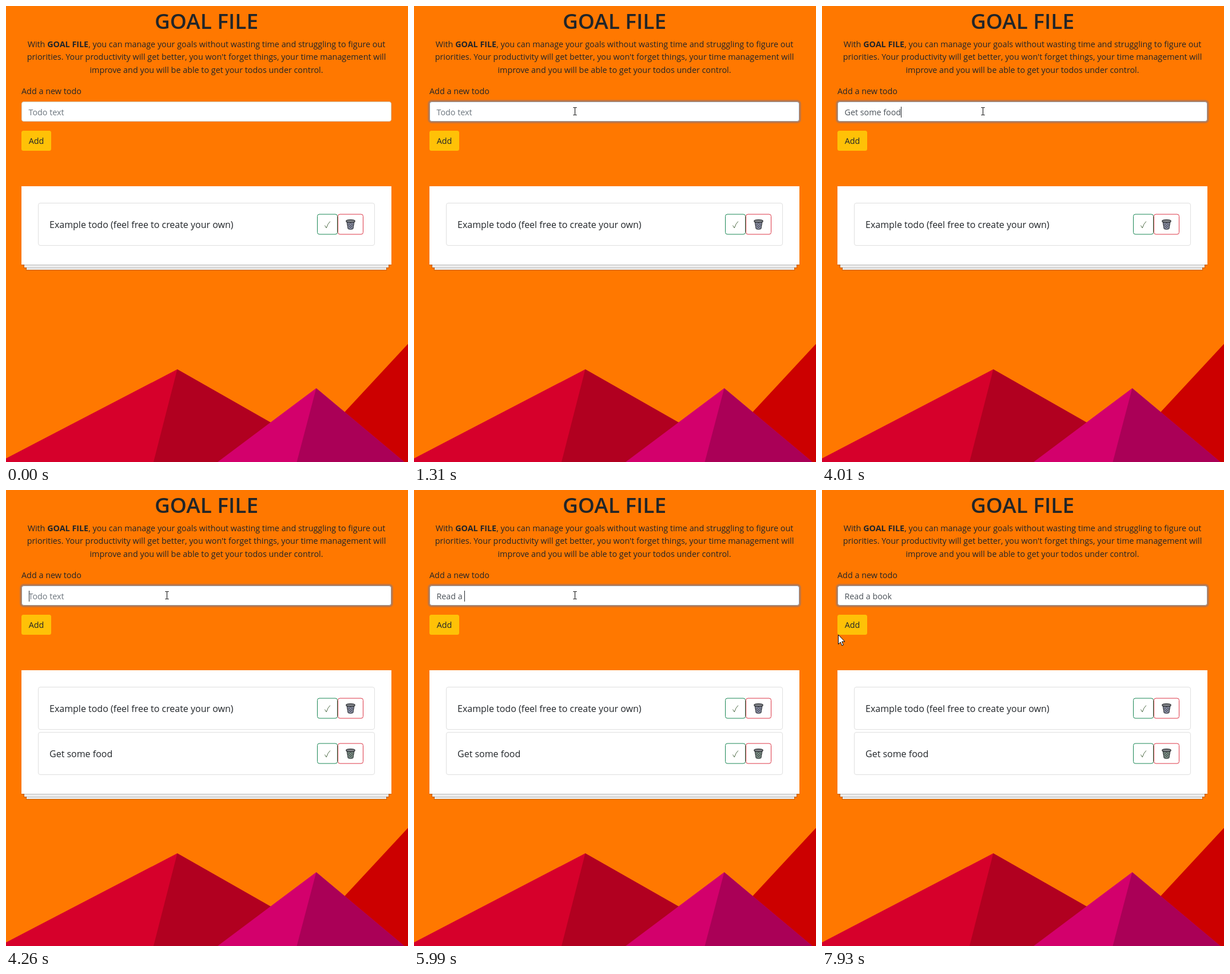
Animation, 703 px wide and 797 px high, one loop 8 s. Source, as an HTML page:

```html
<!DOCTYPE html>
<html lang="en">
<head>
<meta charset="utf-8">
<title>Todo page</title>
<style>
  html, body { margin: 0; width: 100%; height: 100%; overflow: hidden; background: #ff7800; }
  body { font-family: "Open Sans", sans-serif; }
  svg, #card, #field { position: absolute; }
  svg { left: 0; top: 0; fill: #212529; }
  #card {
    left: 27px; top: 315px; width: 647px; background: #fff;
    box-shadow: 0 1px 1px rgba(0,0,0,.2),
      0 10px 0 -5px #eee, 0 10px 1px -4px rgba(0,0,0,.2),
      0 18px 0 -9px #eee, 0 18px 1px -8px rgba(0,0,0,.2);
  }
  #field {
    box-sizing: border-box; left: 27px; top: 167px; width: 647px; height: 35px;
    padding-left: 11.5px; border: 1px solid #ced4da; border-radius: 4px; background: #fff;
    font-size: 14.3px; line-height: 35px; white-space: pre; color: #495057;
  }
  #field.focus { border-color: #8d99a8; box-shadow: 0 0 0 3px #c37640; }
  #caret {
    display: inline-block; width: 1px; height: 19px; margin-right: -1px;
    vertical-align: -4px; background: #212529;
  }
  #hint { color: #6c757d; }
</style>
</head>
<body>
<div id="card"></div>
<div id="field"><span id="typed"></span><i id="caret"></i><span id="hint">Todo text</span></div>

<svg width="703" height="797" viewBox="0 0 703 797">
  <defs>
    <g id="row">
      <rect x="56.5" y="344.5" width="588" height="74" rx="3.5" fill="#fff" stroke="#dfdfdf"/>
      <g fill="#fff">
        <rect x="544.5" y="364" width="35" height="35" rx="3.5" stroke="#198754"/>
        <rect x="580.5" y="364" width="44" height="35" rx="3.5" stroke="#dc3545"/>
      </g>
      <path d="M557.5 383.5l2.7 4.5q2.5-7.5 6.6-11.5" fill="none" stroke="#4d6b45"/>
      <g stroke="#25282c">
        <path d="M596 377l2.2 12.5q4.3 2 8.6 0l2.2-12.5z" fill="currentColor"/>
        <path d="M597 382l9 8M597.5 379l10 9M601 378l7 6M608 382l-9 8M607.5 379l-10 9M604 378l-7 6"
          fill="none" stroke-width=".6"/>
        <ellipse cx="602.5" cy="376" rx="7.7" ry="2.3" fill="#85888d" stroke-width="1.3"/>
      </g>
    </g>
  </defs>

  <g transform="translate(.5 0)">
    <polygon fill="#c00" points="858,423 440,873 1297,873"/>
    <polygon fill="#d6002b" points="-159,873 299,635 717,873"/>
    <polygon fill="#b10020" points="238,873 299,635 717,873"/>
    <polygon fill="#d3006c" points="542,668 787,873 268,873"/>
    <polygon fill="#aa0057" points="488,873 542,668 787,873"/>
  </g>

  <g text-anchor="middle" font-size="14.35">
    <text x="350.5" y="39.5" font-size="37" font-weight="600">GOAL FILE</text>
    <text x="350.5" y="71.5">With <tspan font-weight="700">GOAL FILE</tspan>, you can manage your goals without wasting time and struggling to figure out</text>
    <text x="350.5" y="94">priorities. Your productivity will get better, you won't forget things, your time management will</text>
    <text x="350.5" y="116.5">improve and you will be able to get your todos under control.</text>
  </g>

  <rect x="27" y="218" width="52" height="35" rx="3.5" fill="#ffc107"/>
  <g font-size="14.4">
    <text x="27" y="153.5">Add a new todo</text>
    <text x="53" y="241" text-anchor="middle">Add</text>
  </g>

  <g font-size="16">
    <use href="#row" color="#9297ad"/>
    <text x="76" y="388">Example todo (feel free to create your own)</text>
    <g id="second">
      <use href="#row" y="79" color="#84998e"/>
      <text x="76" y="467">Get some food</text>
    </g>
  </g>

  <g id="pointer">
    <path id="arrow" d="M.5 0v16.5l3.8-3.6 2.6 6 2.5-1.1-2.6-5.8h5.2z" fill="#fff" stroke="#000"/>
    <path id="beam" d="M-3 -6.5h2.5l.5.5.5-.5h2.5M0 -6v12M-3 6.5h2.5l.5-.5.5.5h2.5" transform="translate(.5 0)"
      fill="none" stroke="#000"/>
  </g>
</svg>

<script>
const LOOP = 8000, FOCUS = 826, SUBMIT = 4260;
const el = id => document.getElementById(id);
const show = (id, on) => { el(id).style.display = on ? "" : "none"; };

// Each burst types its characters at even intervals from first to last key.
const bursts = [
  [1610, 1930, "Get"], [2480, 3400, " some f"], [3710, 4010, "ood"],
  [4970, 5990, "Read a "], [6450, 6450, "b"], [6770, 7070, "ook"]
];
const caretOff = [[0, FOCUS], [1310, 1610], [4590, 4970], [7620, LOOP]];

function typedText(t) {
  let text = "";
  for (const [first, last, chars] of bursts) {
    if (t < first || (t >= SUBMIT && first < SUBMIT)) continue;
    const gap = (last - first) / Math.max(1, chars.length - 1);
    text += gap ? chars.slice(0, Math.floor((t - first) / gap + 1.001)) : chars;
  }
  return text;
}

// The pointer moves in visible steps, as a screen recording does.
const stepped = (t, start, gap, count) =>
  Math.max(0, Math.min(1, (Math.floor((t - start) / gap) + 1) / count));
const mix = (a, b, p) => a + (b - a) * p;

function pointerAt(t) {
  if (t < 7620) {
    const p = 1 - (1 - stepped(t, 70, 84, 9)) ** 2;
    return [mix(330, 281, p), mix(798, 184, p)];
  }
  const p = stepped(t, 7620, 77.5, 5);
  return [mix(281, 28, p), mix(184, 253, p)];
}

function draw(now) {
  const t = now % LOOP;
  const text = typedText(t);
  const added = t >= SUBMIT;
  el("field").className = t >= FOCUS ? "focus" : "";
  el("typed").textContent = text;
  show("hint", !text);
  el("caret").style.visibility = caretOff.some(([a, b]) => t >= a && t < b) ? "hidden" : "";
  el("card").style.height = (added ? 216 : 137) + "px";
  show("second", added);

  const [x, y] = pointerAt(t).map(Math.round);
  const overField = y > 167 && y < 203 && x > 27 && x < 674;
  el("pointer").setAttribute("transform", `translate(${x} ${y})`);
  show("arrow", !overField);
  show("beam", overField);
}

function frame() {
  draw(performance.now());
  requestAnimationFrame(frame);
}
frame();
</script>
</body>
</html>
```
